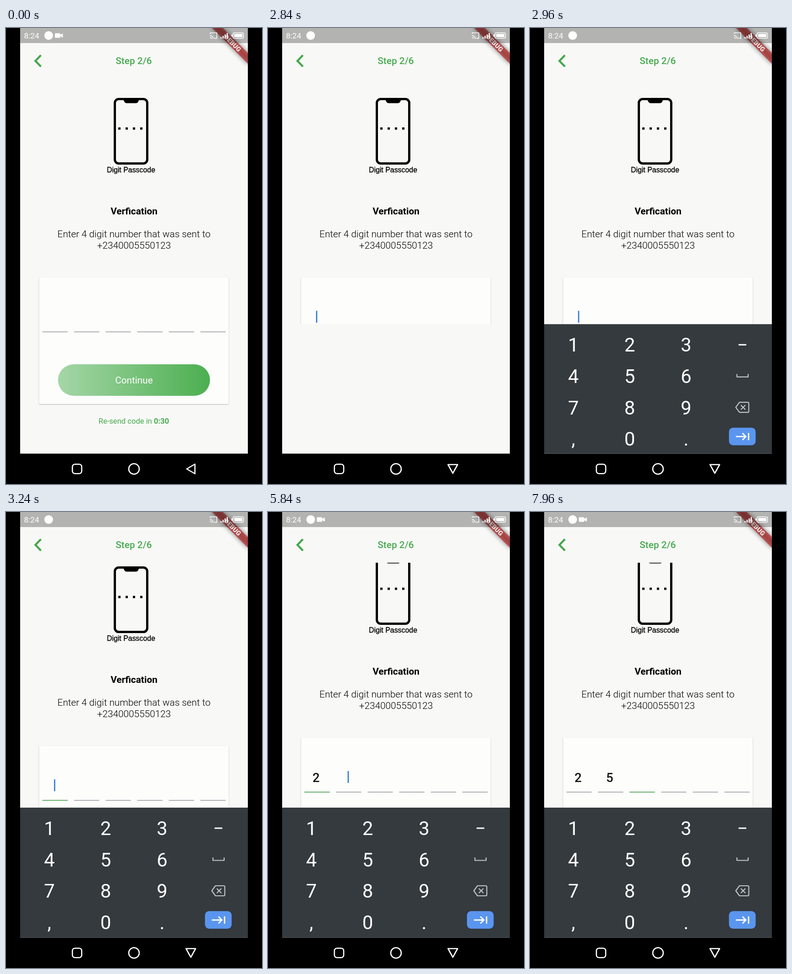
Recreate the animation shown at these times as an HTML page. Size 561x998 px, loop 8000 ms.

```html
<!DOCTYPE html>
<html lang="en">
<head>
<meta charset="utf-8">
<title>Verification step</title>
<style>
  html, body { margin: 0; width: 561px; height: 998px; overflow: hidden; background: #000; }
  svg { display: block; font-family: Roboto, sans-serif; }
  text { text-anchor: middle; }
  .green { fill: #46ab4e; }
  .card { filter: drop-shadow(0 1px 1px rgba(0, 0, 0, .28)); }
  .line { fill: none; stroke: #fff; stroke-linejoin: round; }
</style>
</head>
<body>
<svg width="561" height="998" viewBox="0 0 561 998">
  <defs>
    <linearGradient id="fade"><stop stop-color="#a5d6a7"/><stop offset="1" stop-color="#4caf50"/></linearGradient>
    <clipPath id="app"><rect x="31" width="499" height="931.5"/></clipPath>
    <clipPath id="view"><rect id="viewport" x="31" y="111" width="499" height="821"/></clipPath>
  </defs>
  <rect width="561" height="998"/>

  <g clip-path="url(#app)">
    <rect x="31" width="499" height="932" fill="#f8f8f7"/>
    <path d="M76.5 59.5 64.5 72 76.5 84.5" fill="none" stroke="#43a84b" stroke-width="4.4"/>
    <text class="green" x="280" y="79" font-size="20.8" font-weight="500">Step 2/6</text>

    <g clip-path="url(#view)">
      <g id="page">
        <rect x="238.5" y="155.5" width="71" height="141" rx="8.5" fill="none" stroke="#000" stroke-width="5"/>
        <path d="M257 155H292Q290 164.5 285 164.5H264Q259 164.5 257 155Z"/>
        <path d="M246 220H300" stroke="#000" stroke-width="5" stroke-dasharray="5 11"/>
        <text x="274" y="315.5" font-size="15.9" font-family="Liberation Sans, Arial, sans-serif" stroke="#000" stroke-width=".35">Digit Passcode</text>
        <text x="280.5" y="407.5" font-size="20.8" font-weight="700">Verfication</text>
        <g font-size="20.8" font-weight="300">
          <text x="280.5" y="457.5">Enter 4 digit number that was sent to</text>
          <text x="280.5" y="482.5">+2340005550123</text>
        </g>
        <rect class="card" x="72.5" y="546" width="415.5" height="277" fill="#fdfdfc"/>
        <g id="fields"></g>
        <rect x="114" y="736" width="333" height="69" rx="34.5" fill="url(#fade)"/>
        <text x="280.5" y="778" font-size="20.8" fill="#fff">Continue</text>
        <text class="green" x="280" y="865.5" font-size="16.6">Re-send code in <tspan id="timer" font-weight="700">0:30</tspan></text>
      </g>
    </g>

    <g id="keyboard">
      <rect x="31" y="647" width="499" height="285" fill="#343a3e"/>
      <g id="keys" font-size="42" fill="#fff"></g>
      <path class="line" d="M457 692H474" stroke-width="3"/>
      <g class="line" style="stroke:#c3c6c8" stroke-width="2.2">
        <path d="M453.5 756V762.5H478V756"/>
        <path d="M459 818H477Q479.5 818 479.5 820.5V837.5Q479.5 840 477 840H459L451 829ZM462 824 472 834M472 824 462 834"/>
      </g>
      <rect x="436" y="873.5" width="58.5" height="38.5" rx="9" fill="#5a95ef"/>
      <path class="line" d="M451 893H473M465.5 885.5 473 893 465.5 900.5M479 885V901" stroke-width="2.8" style="stroke-linejoin:miter"/>
    </g>

    <g transform="translate(530) rotate(45)">
      <rect x="-56" y="38.8" width="112" height="16.6" opacity=".5" style="filter:blur(5.5px)"/>
      <rect x="-56" y="38.8" width="112" height="16.6" fill="#b71c1c" fill-opacity=".627"/>
      <text y="52" font-size="14.1" font-weight="900" fill="#fff" fill-opacity=".9">DEBUG</text>
    </g>
    <rect x="31" width="499" height="33" opacity=".28"/>
  </g>

  <g fill="#fff">
    <text x="56" y="23" font-size="17.2">8:24</text>
    <circle cx="93.5" cy="16.5" r="9.5"/>
    <path id="camera" d="M108.5 11.5H117.5Q119 11.5 119 13V15L124.5 11.8V21.2L119 18V20Q119 21.5 117.5 21.5H108.5Q107 21.5 107 20V13Q107 11.5 108.5 11.5Z"/>
    <path class="line" d="M447.5 13V10.5H462V22.5H456M447 20.5A3 3 0 0 1 450 23.5M447 16.5A7 7 0 0 1 454 23.5" stroke-width="1.5"/>
    <path d="M470 20h2.5v3h-2.5zM474.5 17h2.5v6h-2.5zM479 14h2.5v9h-2.5zM483.5 11h2.5v12h-2.5z"/>
    <rect class="line" x="497.5" y="10.5" width="23" height="12" rx="3" stroke-width="1.5"/>
    <rect x="500" y="13" width="18" height="7" rx="1"/>
    <rect x="494" y="14" width="2.5" height="5" rx="1"/>
  </g>

  <g class="line" stroke-width="2.6">
    <rect x="145.5" y="954.8" width="20.4" height="20.4" rx="5.5"/>
    <circle cx="280.5" cy="965" r="11.5"/>
    <path id="back"/>
  </g>
</svg>

<script>
const $ = id => document.getElementById(id);
const LOOP = 8000, SCROLL = 52;
const clamp = v => Math.min(1, Math.max(0, v));
const progress = (t, from, to) => clamp((t - from) / (to - from));
const smooth = p => p * p * (3 - 2 * p);
const within = (t, from, to) => t >= from && t < to;
const show = (el, on) => el.setAttribute('opacity', +on);

$('keys').innerHTML = [...'123456789,0.'].map((key, i) =>
  `<text x="${95 + i % 3 * 123.5}" y="${707 + Math.floor(i / 3) * 68.7}">${key}</text>`).join('');

// Only the first three fields ever take focus
const script = [
  { focus: [1440, 6000], cursor: [[1880, 4000], [4240, 5840]], digit: '2', typed: 5840 },
  { focus: [6000, 7400], cursor: [[5840, 6320]], digit: '5', typed: 7120 },
  { focus: [7400, LOOP], cursor: [[7120, 7720]] }
];

$('fields').innerHTML = Array.from({ length: 6 }, (_, i) => {
  const x = 79.8 + i * 69.25;
  const line = fill => `<rect x="${x}" y="664.3" width="55.4" height="1.5" fill="${fill}"/>`;
  const live = `${line('#4caf50')}
    <rect x="${x + 25.4}" y="619" width="2.8" height="26" fill="#3b7fd6"/>
    <text x="${x + 25.6}" y="642.5" font-size="27.7" font-weight="500" fill="#161616"></text>`;
  return `<g>${line('#98989e')}${script[i] ? live : ''}</g>`;
}).join('');
const fields = [...$('fields').children];

function render(t) {
  script.forEach(({ focus, cursor, digit, typed }, i) => {
    const [, active, caret, label] = fields[i].children;
    const lit = progress(t, focus[0] - 40, focus[0] + (i ? 40 : 120));
    show(active, within(t, ...focus) ? lit : 0);
    show(caret, cursor.some(span => within(t, ...span)));
    label.textContent = t >= typed ? digit : '';
  });

  $('timer').textContent = '0:' + (30 - [960, 1440, 1800].filter(at => t >= at).length);
  show($('camera'), !within(t, 960, 3400));
  $('back').setAttribute('d', t < 2520 ? 'M396 965 414 954.5V975.5Z' : 'M394.5 955.5H415.5L405 974.5Z');

  const rise = t < 2920 ? 0 : progress(t, 2860, 2968);
  const drop = 285 * (1 - rise) ** 2;
  $('keyboard').setAttribute('transform', `translate(0 ${drop})`);
  show($('keyboard'), rise > 0);
  $('viewport').setAttribute('height', t < 2720 ? 821 : 537);
  $('page').setAttribute('transform', `translate(0 ${-SCROLL * smooth(progress(t, 3000, 3400))})`);
}

function tick() {
  render(performance.now() % LOOP);
  requestAnimationFrame(tick);
}
tick();
</script>
</body>
</html>
```
